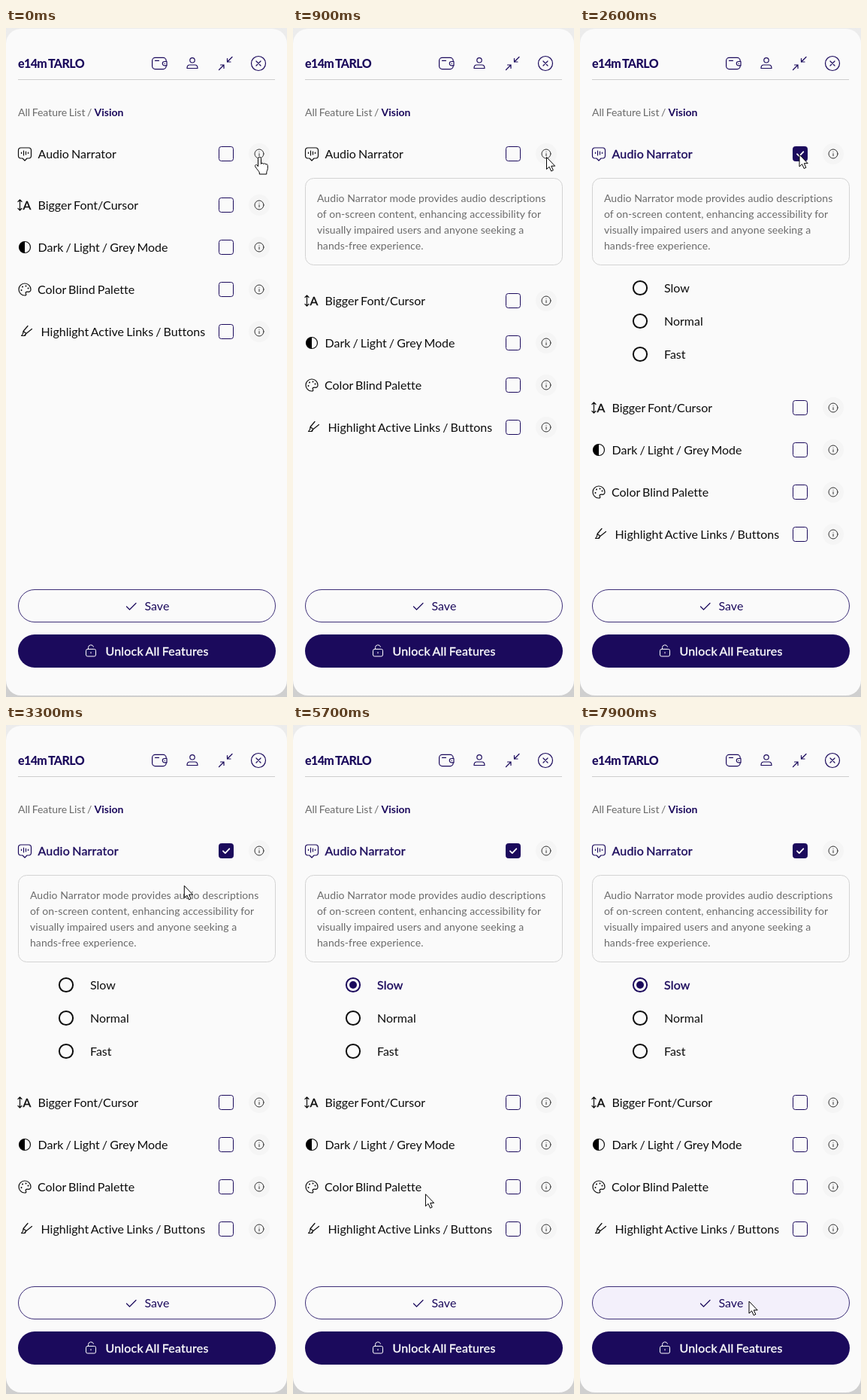
These frames come from a looping animation (374 by 888 pixels, 8 s). An HTML page:

```html
<!DOCTYPE html>
<html lang="en">
<head>
<meta charset="utf-8">
<title>Vision features</title>
<style>
  html, body { margin: 0; width: 100%; height: 100%; overflow: hidden; background: #dcdcdc; }
  svg { display: block; width: 374px; height: 888px; --navy: #1b0a5c;
    font: 16px Lato, sans-serif; font-variant-ligatures: none; word-spacing: -1px; }
  .line { fill: none; stroke: currentColor; stroke-width: 1.2; stroke-linecap: round; stroke-linejoin: round; }
  .thin { stroke-width: 1; }
  .navy { color: var(--navy); }
  text { fill: currentColor; }
  .small { font-size: 14px; color: #6b6b6b; }
  .info { letter-spacing: .06px; word-spacing: 0; }
  .medium { stroke: currentColor; stroke-width: .35; letter-spacing: .2px; }
  .cursor { fill: #fff; stroke: #000; stroke-linejoin: round; }
</style>
</head>
<body>
<svg viewBox="0 0 374 888" color="#0d0d0d">
  <defs>
    <linearGradient id="edge" x2="0" y2="1">
      <stop stop-color="#ececec"/><stop offset="1" stop-color="#cfcfcf"/>
    </linearGradient>
  </defs>
  <rect width="374" height="888" fill="url(#edge)"/>
  <rect y="1" width="374" height="885" rx="20" fill="#fafafa"/>

  <g class="navy">
    <text x="16" y="53" font-size="16" font-weight="800" letter-spacing="-.6">e14m TARLO</text>
    <g class="line">
      <rect x="194.6" y="39.4" width="18.6" height="15.2" rx="4"/>
      <path d="M198.5 43.3h5"/>
      <path d="M214 44.5h-3a2.7 2.7 0 0 0 0 5.4h3z" fill="#fafafa"/>
      <path d="M211 47.2h.2"/>
      <circle cx="248" cy="42.8" r="3.2"/>
      <path d="M244.5 49h7q3.5 0 3.5 4.5h-14q0-4.5 3.5-4.5z"/>
      <path d="M301 38.5l-6.5 6.5m0-4.5v4.5h4.5M283.5 55.5l6.5-6.5m-4.5 0h4.5v4.5"/>
      <circle cx="336" cy="47" r="9.5"/>
      <path d="M333 44l6 6m0-6l-6 6"/>
    </g>
  </g>
  <path d="M16 68.5h342" stroke="#cdcdcd"/>
  <text class="small" x="16" y="117">All Feature List /</text>
  <text class="navy" x="117.5" y="117" font-size="14" font-weight="700">Vision</text>

  <g id="rows"></g>
  <g id="info">
    <rect x="16.5" y="199.5" width="342" height="115" rx="11" fill="none" stroke="#d3d3d3"/>
  </g>
  <g id="speeds"></g>

  <rect id="save" x="16.5" y="745.5" width="342" height="43" rx="21.5" fill="#b9a6f8" stroke="#3d2f78"/>
  <g class="navy">
    <path class="line" d="M160.5 768l4 4 8.5-8.5"/>
    <text x="184.5" y="773">Save</text>
  </g>
  <rect x="16" y="805" width="343" height="44" rx="22" fill="#1b0a5c"/>
  <g color="#fff">
    <g class="line thin">
      <rect x="106.5" y="824.5" width="13" height="9.5" rx="2"/>
      <path d="M109.5 824.5v-2a3.6 3.6 0 0 1 7-1.2M113 828.5v1.5"/>
    </g>
    <text class="medium" x="132.5" y="833">Unlock All Features</text>
  </g>

  <path id="arrow" class="cursor" d="M0 0V16L3.6 12.7 6.2 18.5 8.8 17.3 6.3 11.7H11.2Z"/>
  <path id="hand" class="cursor" d="M-2 1.8a2 2 0 0 1 4 0V9c.3-1.6 3-1.6 3.4.2 .6-1.4 2.8-1.2 3 .6 .8-1 2.4-.5 2.4 1.2v4c0 2-1.5 3.5-1.5 5.5v2h-9.5v-2c0-1.5-4-5-5.5-8-1-2 1.2-3.3 2.6-1.8L-2 12.3Z"/>
</svg>

<script>
const $ = id => document.getElementById(id);
const LOOP = 8000, STEP = 100;

// Name, centre line, text x, icon drawn around the centre line
const features = [
  ['Audio Narrator', 167, 42.5, `<path class="line" d="M20 -8h10q3.5 0 3.5 3.5v7q0 3.5-3.5 3.5h-2l-3 3-3-3h-2q-3.5 0-3.5-3.5v-7q0-3.5 3.5-3.5z
    M20.5 -2v1.5M23.5 -4v6M26.5 -3v4M29.5 -2v1.5"/>`],
  ['Bigger Font/Cursor', 235, 42.5, `<path class="line" d="M18.5 -6.5v13M16 -4.5l2.5-2.5 2.5 2.5M16 4.5l2.5 2.5 2.5-2.5"/>
    <text class="medium" x="22.5" y="5.5">A</text>`],
  ['Dark / Light / Grey Mode', 291, 42.5, `<circle class="line" cx="25" r="7.5"/><path d="M25 -7.5a7.5 7.5 0 0 0 0 15z"/>`],
  ['Color Blind Palette', 347, 42, `<path class="line" d="M25 8a8 8 0 1 1 8-8c0 3-2 3.5-4 3.2-2.5-.3-3.5 1-2.5 2.5 .8 1.3 0 2.3-1.5 2.3z"/>
    <path class="line" style="stroke-width:2" d="M20.5 1h.01M22 -3.5h.01M26.5 -4.5h.01M29.5 -1.5h.01"/>`],
  ['Highlight Active Links / Buttons', 403, 46.5, `<path class="line" d="M34.5 -3.5l-7.5 6-4-3 6-7M23 -.5l-.5 3.5M27 2.5l-2 2M22.5 3l-2 2.5h4.5l1-1"/>`]
];

$('rows').innerHTML = features.map(([name, , x, icon]) => `<g>
  <g class="label">${icon}<text class="name" x="${x}" y="5.5">${name}</text></g>
  <rect class="box" x="283.5" y="-9.5" width="19" height="19" rx="3" fill="none" stroke="#1b0a5c"/>
  <circle cx="337" r="14" fill="#f5f5f5"/>
  <g class="line thin" color="#333"><circle cx="337" r="6"/><path d="M337 -.3v3M337 -2.7v.01"/></g>
</g>`).join('');
const rows = [...$('rows').children];
rows[0].insertAdjacentHTML('beforeend',
  '<path id="tick" class="line" color="#fff" style="stroke-width:1.8" d="M289 .3l2.8 2.8 5.5-5.8"/>');
const [label, title, box] = ['.label', '.name', '.box'].map(s => rows[0].querySelector(s));

$('info').innerHTML += [
  'Audio Narrator mode provides audio descriptions',
  'of on-screen content, enhancing accessibility for',
  'visually impaired users and anyone seeking a',
  'hands-free experience.'
].map((s, i) => `<text class="small info" x="32" y="${231 + 21 * i}">${s}</text>`).join('');

$('speeds').innerHTML = ['Slow', 'Normal', 'Fast'].map((s, i) =>
  `<g transform="translate(0 ${345 + 44 * i})"><circle cx="80" r="9.1" fill="none" stroke="currentColor" stroke-width="2"/>
  <text x="112" y="5.5">${s}</text></g>`).join('');
const slow = $('speeds').firstElementChild;
slow.insertAdjacentHTML('beforeend', '<circle id="dot" cx="80" r="5" fill="#1b0a5c"/>');

const smooth = u => u * u * (3 - 2 * u);
const linear = u => u;

// Value at time t along [time, value] keys
function track(t, keys, ease = smooth) {
  let [t0, v0] = keys[0];
  for (const [t1, v1] of keys) {
    if (t < t1) return t <= t0 ? v0 : v0 + (v1 - v0) * ease((t - t0) / (t1 - t0));
    [t0, v0] = [t1, v1];
  }
  return v0;
}

function draw(t) {
  const shift = track(t, [[100, 0], [600, 127], [2000, 127], [2500, 269], [2700, 269], [3000, 266]]);
  rows.forEach((row, i) =>
    row.setAttribute('transform', `translate(0 ${features[i][1] + (i && shift)})`));

  const checked = t >= 2000, chosen = t >= 4300;
  label.classList.toggle('navy', checked);
  title.classList.toggle('medium', checked);
  box.setAttribute('fill', checked ? '#1b0a5c' : 'none');
  $('tick').style.opacity = +checked;
  slow.classList.toggle('navy', chosen);
  slow.querySelector('text').classList.toggle('medium', chosen);

  $('info').style.opacity = track(t, [[100, 0], [600, 1]]);
  $('speeds').style.opacity = track(t, [[2000, 0], [2500, 1]]);
  $('dot').style.opacity = track(t, [[4000, 0], [4200, .4], [4400, 1]], linear);
  $('save').setAttribute('fill-opacity',
    track(t, [[6100, 0], [6400, 1], [6500, 1], [7900, .12]], linear));

  const x = track(t, [[1000, 337.5], [1700, 292], [3000, 292], [3900, 81], [4760, 81], [6300, 225]]);
  const y = track(t, [[1000, 171.5], [1700, 168], [3000, 168], [3900, 343], [4760, 343], [6300, 765]]);
  const pointing = t < 300 || (t >= 1600 && t < 2200) || (t >= 6100 && t < 6800);
  for (const id of ['arrow', 'hand']) {
    $(id).setAttribute('transform', `translate(${x} ${y})`);
    $(id).style.display = (id === 'hand') === pointing ? '' : 'none';
  }
}

const start = performance.now();
function frame() {
  const t = (performance.now() - start) % LOOP;
  draw(Math.floor(t / STEP) * STEP);
  requestAnimationFrame(frame);
}
frame();
</script>
</body>
</html>
```
